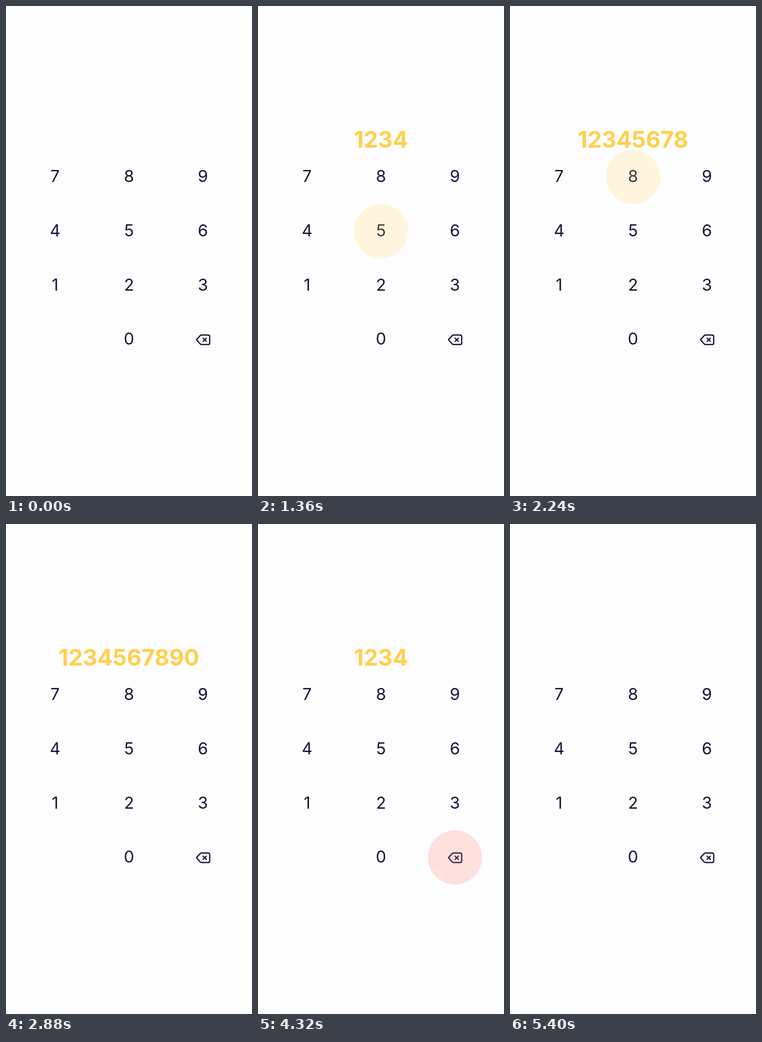
An HTML page that plays this animation: 531 by 1055 pixels, repeating every 5.48 s.

```html
<!DOCTYPE html>
<html lang="en">
<head>
<meta charset="utf-8">
<title>Keypad</title>
<style>
  html, body { margin: 0; width: 100%; height: 100%; overflow: hidden; background: #fefdff; }
  svg { display: block; width: 100%; height: 100%; }
  text { font-family: Inter, sans-serif; text-anchor: middle; }
  .key { font-size: 35.6px; fill: #19143a; }
  #entry { font-size: 49px; font-weight: 700; fill: #ffd04f; }
  .icon { fill: none; stroke: #19143a; stroke-width: 2.7; stroke-linecap: round; stroke-linejoin: round; }
</style>
</head>
<body>
<svg id="stage" viewBox="0 0 531 1055">
  <text id="entry" x="265.4" y="304.8"></text>
  <path class="icon" d="M422 708.3H436.2Q439.7 708.3 439.7 711.8V725.4Q439.7 728.9 436.2 728.9H422Q420.4 728.9 419.3 727.7L411.9 719.7Q410.9 718.6 411.9 717.5L419.3 709.5Q420.4 708.3 422 708.3ZM425.5 715.1L432.5 722.1M432.5 715.1L425.5 722.1"/>
</svg>
<script>
const LOOP = 5480;
const DIGITS = "1234567890";
const TAP_HOLD = 60, FADE = 270, PEAK = 0.2;
const taps = [190, 430, 750, 1030, 1340, 1540, 1905, 2165, 2400, 2600];
const erase = { down: 3315, first: 3420, every: 165, up: 5100 };

const stage = document.getElementById("stage");
const entry = document.getElementById("entry");

function add(tag, attrs) {
  const node = document.createElementNS("http://www.w3.org/2000/svg", tag);
  for (const name in attrs) node.setAttribute(name, attrs[name]);
  return stage.appendChild(node);
}

// Each key has a translucent disc above its label.
function addKey(label, column, row, color, down, up) {
  const x = 105.9 + 159.6 * column;
  const y = 116.7 * row;
  if (label) add("text", { class: "key", x, y: 379.2 + y }).textContent = label;
  const disc = add("circle", { cx: x, cy: 367.9 + y, r: 58.3, fill: color, opacity: 0 });
  return { disc, down, up };
}

const keys = [...DIGITS].map((digit, i) => {
  const [column, row] = digit === "0" ? [1, 3] : [i % 3, 2 - Math.floor(i / 3)];
  return addKey(digit, column, row, "#ffd34f", taps[i], taps[i] + TAP_HOLD);
});
keys.push(addKey("", 2, 3, "#ff6961", erase.down, erase.up));

const easeInOut = p => p < 0.5 ? 2 * p * p : 1 - 2 * (1 - p) ** 2;

function glow(t, { down, up }) {
  if (t < down) return 0;
  const p = Math.min(1, Math.max(0, (t - up) / FADE));
  return PEAK * (1 - easeInOut(p));
}

function draw(t) {
  const typed = taps.filter(tap => t >= tap + TAP_HOLD).length;
  const erased = Math.max(0, Math.floor((t - erase.first) / erase.every) + 1);
  entry.textContent = DIGITS.slice(0, Math.max(0, typed - erased));
  for (const key of keys) key.disc.setAttribute("opacity", glow(t, key));
}

const start = performance.now();
function tick() {
  draw((performance.now() - start) % LOOP);
  requestAnimationFrame(tick);
}
tick();
</script>
</body>
</html>
```
